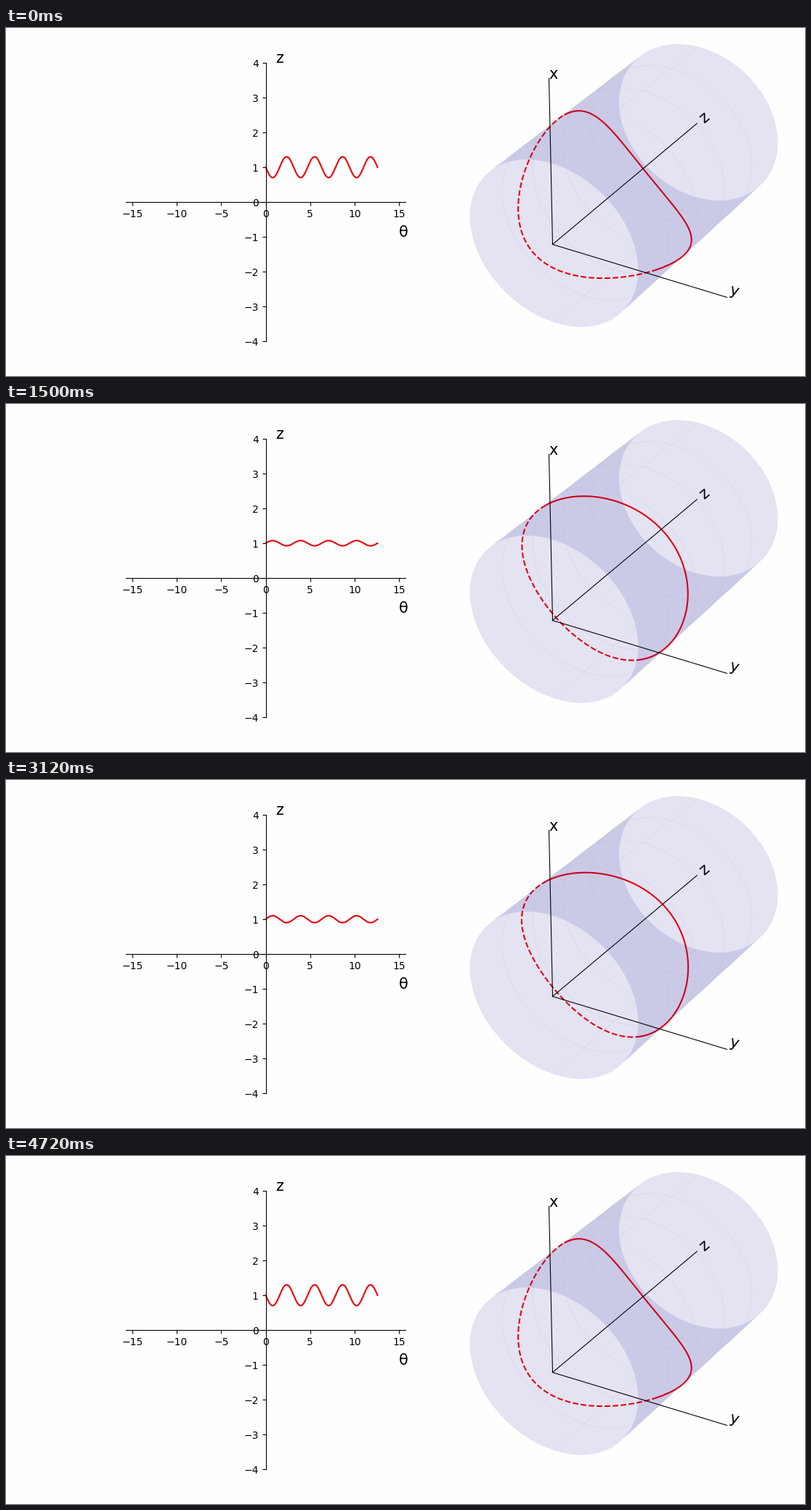
These frames come from a looping animation (1100 px wide and 480 px high, 4820 ms). A matplotlib script:

```python
import numpy as np
import matplotlib.pyplot as plt
from matplotlib.animation import FuncAnimation

W, H, DPI = 1100, 480, 100
TICK = 20            # ms per drawn frame
LOOP = 4820          # ms per loop
RISE = 2420          # the amplitude turns round here
BG = "#fefefe"

# Homogeneous image of the origin and of the x, y and z directions
CAM = np.array([
    [752.0, 298.0, 1.0],
    [-17.8, -115.9, -0.0205],
    [102.34, 29.9, -0.0178],
    [95.62, -51.63, 0.0308],
])


def project(x, y, z):
    x, y, z = np.broadcast_arrays(x, y, z)
    p = np.stack([np.ones(x.shape), x, y, z], axis=-1) @ CAM
    return p[..., 0] / p[..., 2], p[..., 1] / p[..., 2]


def on_cylinder(theta, z):
    return project(np.cos(theta), np.sin(theta), z)


def silhouette():
    """Angles at which the cylinder wall is seen edge-on."""
    o, a, b, c = CAM
    det = lambda *rows: np.linalg.det(np.array(rows))
    p, q, r = det(o, b, c), det(o, a, c), det(a, b, c)
    mid = -np.arctan2(q, p)
    half = np.arccos(-r / np.hypot(p, q))
    t0, t1 = sorted(((mid - half + np.pi) % (2 * np.pi) - np.pi,
                     (mid + half + np.pi) % (2 * np.pi) - np.pi))
    return t0, t1


def amplitude(ms):
    if ms < RISE:
        return -0.3 + 0.025 * (ms // 100)
    return 0.275 - 0.025 * ((ms - RISE) // 100)


fig = plt.figure(figsize=(W / DPI, H / DPI), dpi=DPI, facecolor=BG)

# Left: z against theta
graph = fig.add_axes([0.15, 0.1, 0.35, 0.8], facecolor=BG)
graph.set_xlim(-5 * np.pi, 5 * np.pi)
graph.set_ylim(-4, 4)
graph.set_xticks(range(-15, 16, 5))
graph.set_yticks(range(-4, 5))
graph.spines[["top", "right"]].set_visible(False)
graph.spines[["left", "bottom"]].set_position("zero")
turns = np.linspace(0, 4 * np.pi, 400)
wave, = graph.plot([], [], color="#e8000b", lw=1.5)

# Right: the cylinder, in pixel coordinates
scene = fig.add_axes([0, 0, 1, 1])
scene.set_xlim(-0.5, W - 0.5)
scene.set_ylim(H - 0.5, -0.5)
scene.axis("off")

front = np.radians(np.linspace(-40, 150, 200))
back = np.radians(np.linspace(150, 320, 200))
solid, = scene.plot([], [], color="red", lw=1.5, zorder=1)
dashed, = scene.plot([], [], color="red", lw=1.5, ls="--", zorder=1)


def wall(start, end):
    theta = np.linspace(start, end, 150)
    xs, ys = on_cylinder(np.r_[theta, theta[::-1]], np.repeat([0, 3], 150))
    scene.fill(xs, ys, color=(0, 0, 0.56), alpha=0.105, lw=0, zorder=2)


t0, t1 = silhouette()
wall(t0, t1)
wall(t1, t0 + 2 * np.pi)

# Faint seams of the surface mesh
seam = dict(color="#a8a8a8", alpha=0.35, lw=0.7, ls=":", zorder=3)
circle = np.linspace(0, 2 * np.pi, 200)
for z in (0.6, 1.2, 1.8, 2.4):
    scene.plot(*on_cylinder(circle, z), **seam)
for theta in (0, np.pi):
    scene.plot(*on_cylinder(theta, np.array([0, 3])), **seam)

for end in ((2, 0, 0), (0, 2, 0), (0, 0, 3)):
    scene.plot(*project(*np.array([(0, 0, 0), end]).T),
               color="black", lw=0.8, zorder=4)


def label(x, y, text, angle=0):
    scene.text(x, y, text, fontsize=15, rotation=angle, ha="center",
               va="center_baseline" if False else "center", zorder=5)


label(376.5, 41.5, "z")
label(547, 281, "θ")
label(753, 64, "x")
label(1002, 363, "y", -16)
label(961, 123.5, "z", 40)


def update(frame):
    amp = amplitude(frame * TICK)
    wave.set_data(turns, 1 + amp * np.sin(2 * turns))
    for line, theta in ((solid, front), (dashed, back)):
        line.set_data(*on_cylinder(theta, 1 + amp * np.sin(2 * theta)))
    return wave, solid, dashed


anim = FuncAnimation(fig, update, frames=LOOP // TICK, interval=TICK,
                     repeat=True, repeat_delay=0)
plt.show()
```
